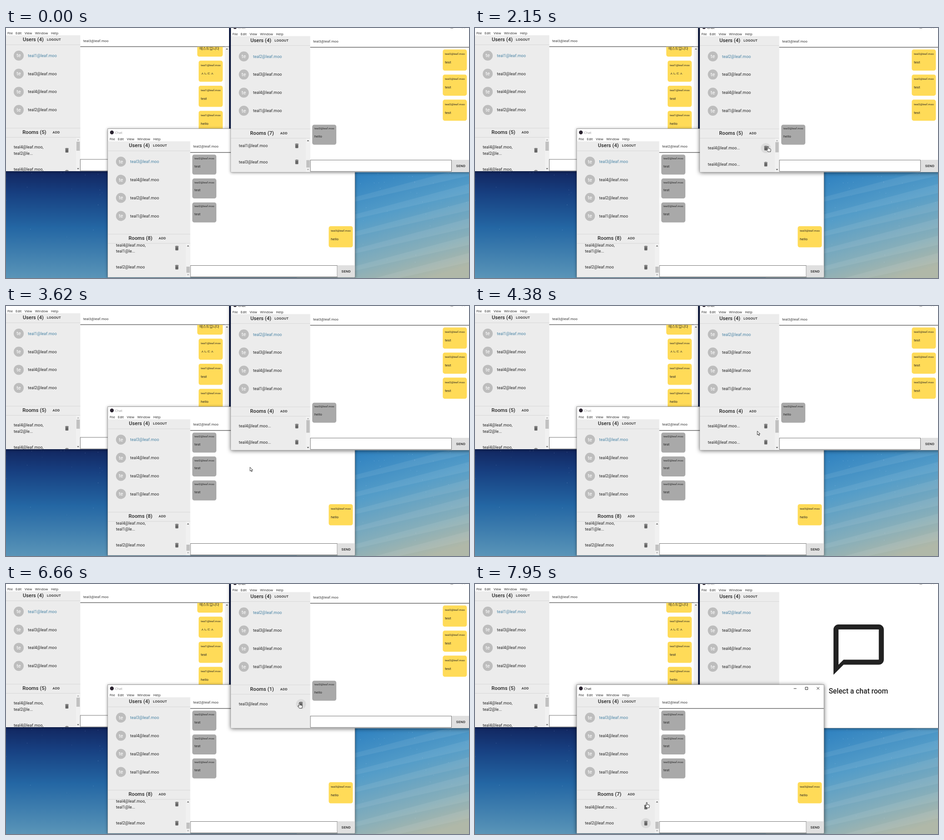
An HTML page for the animation above (8000 ms loop, 1019 by 550 pixels).

```html
<!DOCTYPE html>
<html lang="en">
<head>
<meta charset="utf-8">
<title>Chat</title>
<style>
  html, body { margin: 0; width: 100%; height: 100%; overflow: hidden; background: #14296a; }
  svg { display: block; }
  #stage { width: 1019px; height: 550px; }
  text { font-family: Roboto, "Noto Sans CJK KR", "Noto Sans CJK", sans-serif; fill: #222; white-space: pre; }
  .ui { font-family: "Open Sans", "Noto Sans", sans-serif; }
  .frame { filter: drop-shadow(0 1px 3px rgba(0, 0, 0, .45)); }
  .active .frame { filter: drop-shadow(0 1px 5px rgba(0, 0, 0, .6)); }
  .title { fill: #999; }
  .buttons { opacity: 0; }
  .active .title { fill: #111; }
  .active .buttons { opacity: 1; }
</style>
</head>
<body>
<svg id="stage" viewBox="0 0 1019 550" xmlns="http://www.w3.org/2000/svg">
  <defs>
    <linearGradient id="night" x1="0" y1="0" x2="0" y2="1">
      <stop offset="0" stop-color="#07164a"/>
      <stop offset=".57" stop-color="#12265f"/>
      <stop offset=".66" stop-color="#173f80"/>
      <stop offset=".8" stop-color="#2467a4"/>
      <stop offset="1" stop-color="#5a95b8"/>
    </linearGradient>
    <linearGradient id="dawn" gradientUnits="userSpaceOnUse" x1="820" y1="300" x2="900" y2="560">
      <stop offset="0" stop-color="#2d80c0"/>
      <stop offset=".4" stop-color="#559dc8"/>
      <stop offset=".75" stop-color="#86aeba"/>
      <stop offset="1" stop-color="#b0b8a8"/>
    </linearGradient>
  </defs>
</svg>
<script>
const NS = 'http://www.w3.org/2000/svg';
const stage = document.getElementById('stage');
const LOOP = 8000, STEP = 70;
const GREY = '#a9a9a9', YELLOW = '#ffdb58', PANEL = '#ececec';
const TRASH = 'M6 19c0 1.1.9 2 2 2h8c1.1 0 2-.9 2-2V7H6v12zM19 4h-3.5l-1-1h-5l-1 1H5v2h14V4z';
const BUBBLE = 'M20 2H4c-1.1 0-2 .9-2 2v18l4-4h14c1.1 0 2-.9 2-2V4c0-1.1-.9-2-2-2zm0 14H6l-2 2V4h16v12z';
const SCALE = 0.554;

function add(parent, tag, attrs = {}) {
  const el = document.createElementNS(NS, tag);
  for (const k in attrs) el.setAttribute(k, attrs[k]);
  parent.appendChild(el);
  return el;
}
const rect = (p, x, y, width, height, fill, more) => add(p, 'rect', { x, y, width, height, fill, ...more });
const group = (p, more) => add(p, 'g', more);
const clip = (p, x, y, width, height) =>
  add(p, 'svg', { x, y, width, height, viewBox: `${x} ${y} ${width} ${height}`, overflow: 'hidden' });

// Text styles: size, weight, tracking in em
const STYLE = {
  head: [11.08, 500, .0075], body: [8.86, 400, .0094], small: [7.75, 400, .0107],
  tiny: [6.1, 400, .0094], button: [7.75, 500, .0286], big: [15.6, 500, 0]
};
function text(p, x, cy, str, style, more) {
  const [size, weight, track] = STYLE[style];
  const el = add(p, 'text', {
    x, y: cy + size * .342, 'font-size': size, 'font-weight': weight, 'letter-spacing': size * track, ...more
  });
  el.textContent = str;
  return el;
}
function uiText(p, x, cy, str, cls = '') {
  const el = add(p, 'text', { x, y: cy + 2.8, 'font-size': 7.5, class: 'ui ' + cls });
  el.textContent = str;
}
const mail = n => `teal${n}@leaf.moo`;

function drawMenu(p, x, cy) {
  ['File', 'Edit', 'View', 'Window', 'Help'].forEach((s, i) => uiText(p, x + [0, 18, 38, 61, 96][i], cy, s));
}

// Sidebar with the user list; returns the room counter
function drawSidebar(p, o) {
  rect(p, o.x, o.y, o.w, o.h, PANEL);
  text(p, o.headX, o.y + 9, 'Users (4)', 'head');
  text(p, o.headX + 53, o.y + 9.5, 'LOGOUT', 'button');
  for (const dy of [20.5, 203.8, 224.2]) rect(p, o.x, o.y + dy, o.w, .8, '#d2d2d2');
  o.users.forEach((n, i) => {
    const cy = o.y + 44.7 + i * 39.85;
    add(p, 'circle', { cx: o.userX, cy, r: 11, fill: '#bdbdbd' });
    text(p, o.userX, cy, 'te', 'head', { 'text-anchor': 'middle', style: 'fill:#fff;font-weight:400' });
    text(p, o.userX + 20.3, cy, mail(n), 'body', i ? {} : { style: 'fill:#4682a4' });
  });
  text(p, o.headX + 72 - 6.5, o.y + 213.5, 'ADD', 'button');
  return text(p, o.headX - .7, o.y + 213, '', 'head');
}

function drawHeader(p, x, right, lineY, n) {
  text(p, x + 6.5, lineY - 13, mail(n), 'small', { style: 'fill:#333' });
  rect(p, x, lineY - .6, right - x, 1.2, '#4a4a4a');
}

function drawMessage(p, x, y, n, body, mine) {
  rect(p, x, y, 53, mine ? 46.5 : 44, mine ? YELLOW : GREY, { rx: 4.5 });
  const top = y + (mine ? 10 : 8.5);
  text(p, x + 4.7, top, mail(n), 'tiny');
  text(p, x + 4.7, top + (mine ? 18.4 : 17), body, 'small');
}

function drawInput(p, x, y, sendX, right) {
  rect(p, x + .5, y + .5, sendX - x - 1, 25, '#fff', { stroke: '#777', 'stroke-width': 1 });
  if (!right) return;
  rect(p, sendX, y, right - sendX, 26.5, '#e0e0e0', { rx: 2 });
  text(p, (sendX + right) / 2, y + 13, 'SEND', 'button', { 'text-anchor': 'middle' });
}

function drawArrow(p, x, y, up, live) {
  const d = up ? -1.3 : 1.3;
  add(p, 'path', { d: `M${x - 2.4} ${y - d}h4.8l-2.4 ${2 * d}z`, fill: live ? '#505050' : '#a3a3a3' });
}

function drawScroll(p, x, y, h, thumb, up, down) {
  rect(p, x, y, 9.5, h, '#f1f1f1');
  if (thumb) rect(p, x + 1, thumb[0], 7.5, thumb[1], '#c1c1c1');
  drawArrow(p, x + 4.7, y + 5, true, up);
  if (down !== undefined) drawArrow(p, x + 4.7, y + h - 5.2, false, down);
}

function drawRow(p, x, trashX, row) {
  row.lines.forEach((s, i) => text(p, x, row.y + (i - (row.lines.length - 1) / 2) * 13.2, s, 'body'));
  if (row.hover) add(p, 'circle', { cx: trashX, cy: row.y, r: 11, fill: '#dcdcdc' });
  add(p, 'path', {
    d: TRASH, fill: '#666',
    transform: `translate(${trashX - 12 * SCALE} ${row.y - 12 * SCALE}) scale(${SCALE})`
  });
}

// Desktop
rect(stage, 0, 0, 1019, 550, 'url(#night)');
rect(stage, 640, 300, 379, 250, 'url(#dawn)');
for (let i = 0; i < 6; i++) {
  const y = 350 + i * 38;
  add(stage, 'path', { d: `M768 ${y + 22}L1019 ${y - 45}V${y - 25}L768 ${y + 32}z`, fill: '#fff', opacity: .07 });
}
let seed = 7;
const random = () => (seed = seed * 16807 % 2147483647) / 2147483647;
for (let i = 0; i < 110; i++) {
  const x = random() * 1019, y = 318 + random() * random() * 230;
  rect(stage, x, y, .9, .9, '#cfe6ff', { opacity: .15 + random() * .4 });
}

// Left window
const left = group(stage);
rect(left, -20, -20, 511, 335, '#fff', { class: 'frame' });
drawMenu(left, 3, 11);
const leftCount = drawSidebar(left, { x: 0, y: 16, w: 163.5, h: 299, headX: 37, userX: 28, users: [1, 3, 4, 2] });
leftCount.textContent = 'Rooms (5)';
drawHeader(left, 163.5, 491, 41, 3);
const chat = clip(left, 163.5, 41.6, 327.5, 247);
rect(chat, 421, 17, 56, 46, YELLOW, { rx: 4.5 });
text(chat, 426, 45, '테스트입니다', 'small');
['ㅅㄴㄷㅅ', 'test', 'hello'].forEach((s, i) => drawMessage(chat, 424, 71.8 + i * 55.2, 1, s, true));
drawScroll(chat, 481.5, 41, 274, null, true);
const leftRooms = clip(left, 0, 241, 163.5, 74);
drawRow(leftRooms, 17, 134, { y: 269, lines: [mail(4) + ',', 'teal2@le...'] });
drawRow(leftRooms, 17, 134, { y: 317.6, lines: [mail(4) + ',', 'teal1@le...'] });
drawScroll(leftRooms, 154, 241, 74, [250, 20], false, true);
drawInput(left, 163, 288.5, 485);

// Front window
const front = group(stage);
rect(front, 224, 221.5, 544, 327, '#fff', { class: 'frame', stroke: '#8a8a8a', 'stroke-width': .8 });
add(front, 'circle', { cx: 233, cy: 229.7, r: 4.2, fill: '#2b2430' });
uiText(front, 240, 230, 'Chat', 'title');
add(front, 'path', {
  class: 'buttons', fill: 'none', stroke: '#111', 'stroke-width': .9,
  d: 'M701.5 230h6M727 227h5.4v5.4H727zM752.2 226.8l5.6 5.6M757.8 226.8l-5.6 5.6'
});
drawMenu(front, 228, 244);
const frontCount = drawSidebar(front, { x: 224.5, y: 249.3, w: 181, h: 299, headX: 270.5, userX: 253, users: [3, 4, 2, 1] });
drawHeader(front, 405.5, 767.6, 273.8, 2);
for (let i = 0; i < 3; i++) drawMessage(front, 410, 278.5 + i * 52.6, 2, 'test', false);
drawMessage(front, 710.3, 436, 3, 'hello', true);
drawInput(front, 405.5, 522, 729.5, 767.5);
const frontRooms = clip(front, 224.5, 474.3, 181, 74);

// Right window
const right = group(stage);
rect(right, 495, -20, 540, 337, '#fff', { class: 'frame', stroke: '#8a8a8a', 'stroke-width': .6 });
add(right, 'circle', { cx: 504, cy: -2, r: 4.2, fill: '#2b2430' });
uiText(right, 511, -1, 'Chat', 'title');
add(right, 'path', {
  fill: 'none', stroke: '#777', 'stroke-width': .9,
  d: 'M978.5 -5h5.4v5.4h-5.4zM1004 -5l5.6 5.6M1009.6 -5l-5.6 5.6'
});
drawMenu(right, 498.3, 13);
const rightCount = drawSidebar(right, { x: 495, y: 17.8, w: 174.5, h: 299, headX: 538, userX: 523.4, users: [2, 3, 4, 1] });
const rightRooms = clip(right, 495, 242.8, 174.5, 74);
const openRoom = group(right);
drawHeader(openRoom, 669.5, 1019, 42.4, 3);
for (let i = 0; i < 3; i++) drawMessage(openRoom, 961.3, 47.2 + i * 55.2, 2, 'test', true);
drawMessage(openRoom, 674, 212.7, 3, 'hello', false);
drawInput(openRoom, 669.5, 290, 981, 1021);
const noRoom = group(right);
add(noRoom, 'path', { d: BUBBLE, fill: '#222', transform: 'translate(777.9 77.9) scale(5.54)' });
text(noRoom, 843.7, 236, 'Select a chat room', 'big', { 'text-anchor': 'middle' });

// Pointer
const flash = add(stage, 'circle', { fill: '#f4ea3c', style: 'mix-blend-mode:multiply' });
const pointer = group(stage);
const ink = { fill: '#fff', stroke: '#222', 'stroke-width': .9, 'stroke-linejoin': 'round' };
const arrow = add(pointer, 'path', { d: 'M0 0V8.6L2 6.8 3.5 10 4.9 9.4 3.5 6.3H6.2z', ...ink });
const hand = add(pointer, 'path', {
  d: 'M-1 .5q1-1.2 2 0V4.6l4.2 1q1 .3.9 1.4l-.6 4.8h-5.6l-3.6-4.4q-.4-1.2 1-1l1.7 1.2z', ...ink
});

// Timeline: [start, end, from, to]
const MOVES = [
  [100, 240, [745, 444], [852, 344]],
  [500, 1050, [852, 344], [644, 260.5]],
  [1670, 1740, [644, 260.5], [645, 260.5]],
  [3270, 3760, [645, 260.5], [501, 386]],
  [3900, 4380, [501, 386], [636, 261.5]],
  [6380, 6450, [636, 261.5], [646, 261.5]],
  [6800, 7210, [646, 261.5], [389, 465]],
  [7460, 7600, [389, 465], [378, 480.5]]
];
const CLICKS = [1190, 4590, 5690, 6520, 7670];
const WIDE = mail(4) + '...';
// Right window rooms: [time, count, visible rows]
const ROOMS = [
  [0, 7, [mail(1), mail(3)]], [1450, 6, [WIDE, WIDE]], [1950, 5, [WIDE, WIDE]],
  [2500, 2, [mail(1), mail(3)]], [2780, 1, [mail(3)]], [3130, 5, [WIDE, WIDE]],
  [3480, 4, [WIDE, WIDE]], [4730, 3, [WIDE, mail(1)]], [4930, 2, [mail(1), mail(3)]],
  [5070, 1, [mail(3)]], [5410, 2, [mail(1), mail(3)]], [5900, 1, [mail(3)]], [6870, 1, [mail(1)]]
];
const CLOSE_ROOM = 6870, FOCUS_RIGHT = 1330, FOCUS_FRONT = 7740, DELETE_FRONT = 7880;

const latest = (table, t) => table.filter(r => r[0] <= t).pop();

function pointerAt(t) {
  const m = latest(MOVES, t);
  if (!m) return null;
  const [start, end, a, b] = m;
  const done = (Math.floor((t - start) / STEP) + 1) * STEP;
  const p = Math.min(1, done / (end - start + STEP));
  return a.map((v, i) => v + (b[i] - v) * p);
}

const near = (pos, x, y) => !!pos && Math.hypot(pos[0] - x, pos[1] - y) < 9;

// Redraws a room list only when its content differs
const drawn = new Map();
function refresh(box, rows, x, trashX, scroll) {
  const key = JSON.stringify([rows, trashX, scroll]);
  if (drawn.get(box) === key) return;
  drawn.set(box, key);
  box.replaceChildren();
  rows.forEach(r => drawRow(box, x, trashX, r));
  if (scroll) drawScroll(box, ...scroll);
}

function rightList(t, pos) {
  const [, count, names] = latest(ROOMS, t);
  const many = count > 1, atEnd = count === 7;
  const trashX = many ? 640 : 649.3;
  const rows = names.map((s, i) => {
    const y = (atEnd ? 259.2 : 264.2) + i * 35.4;
    return { y, lines: [s], hover: near(pos, trashX, y) };
  });
  const size = 56 * 75 / (count * 35.35 + 10);
  const scroll = many && [660, 242.8, 74, [atEnd ? 307 - size : 251, size], atEnd, !atEnd];
  refresh(rightRooms, rows, 512.5, trashX, scroll);
  rightCount.textContent = `Rooms (${count})`;
  return rows.some(r => r.hover);
}

function frontList(t, pos) {
  const cut = t >= DELETE_FRONT;
  const y = cut ? 490.8 : 484.2;
  const rows = [
    { y, lines: cut ? [WIDE] : [mail(4) + ',', 'teal1@le...'], hover: near(pos, 376, y) },
    { y: 526.2, lines: [mail(2)], hover: cut }
  ];
  const top = cut ? 523 : 525;
  refresh(frontRooms, rows, 242, 376, [396, 474.3, 74, [top, 538.5 - top], true, false]);
  frontCount.textContent = `Rooms (${cut ? 7 : 8})`;
  return cut || rows[0].hover;
}

let topmost = right;
function raise(win) {
  if (win === topmost) return;
  topmost = win;
  stage.insertBefore(win, flash);
}

function render(t) {
  const pos = pointerAt(t);
  const overRight = rightList(t, pos), overFront = frontList(t, pos);
  const over = overRight || overFront;
  raise(t >= FOCUS_FRONT ? front : right);
  right.classList.toggle('active', t >= FOCUS_RIGHT && t < FOCUS_FRONT);
  front.classList.toggle('active', t >= FOCUS_FRONT);
  openRoom.style.display = t < CLOSE_ROOM ? '' : 'none';
  noRoom.style.display = t < CLOSE_ROOM ? 'none' : '';

  pointer.style.display = pos ? '' : 'none';
  if (pos) pointer.setAttribute('transform', `translate(${pos})`);
  hand.style.display = over ? '' : 'none';
  arrow.style.display = over ? 'none' : '';

  const click = CLICKS.find(c => t >= c && t < c + 2 * STEP);
  flash.style.display = click ? '' : 'none';
  if (click) {
    flash.setAttribute('cx', pos[0] + .5);
    flash.setAttribute('cy', pos[1] + 1.5);
    flash.setAttribute('r', t - click < STEP ? 6 : 9);
  }
}

const start = performance.now();
function tick() {
  render((performance.now() - start) % LOOP);
  requestAnimationFrame(tick);
}
render(0);
requestAnimationFrame(tick);
</script>
</body>
</html>
```
